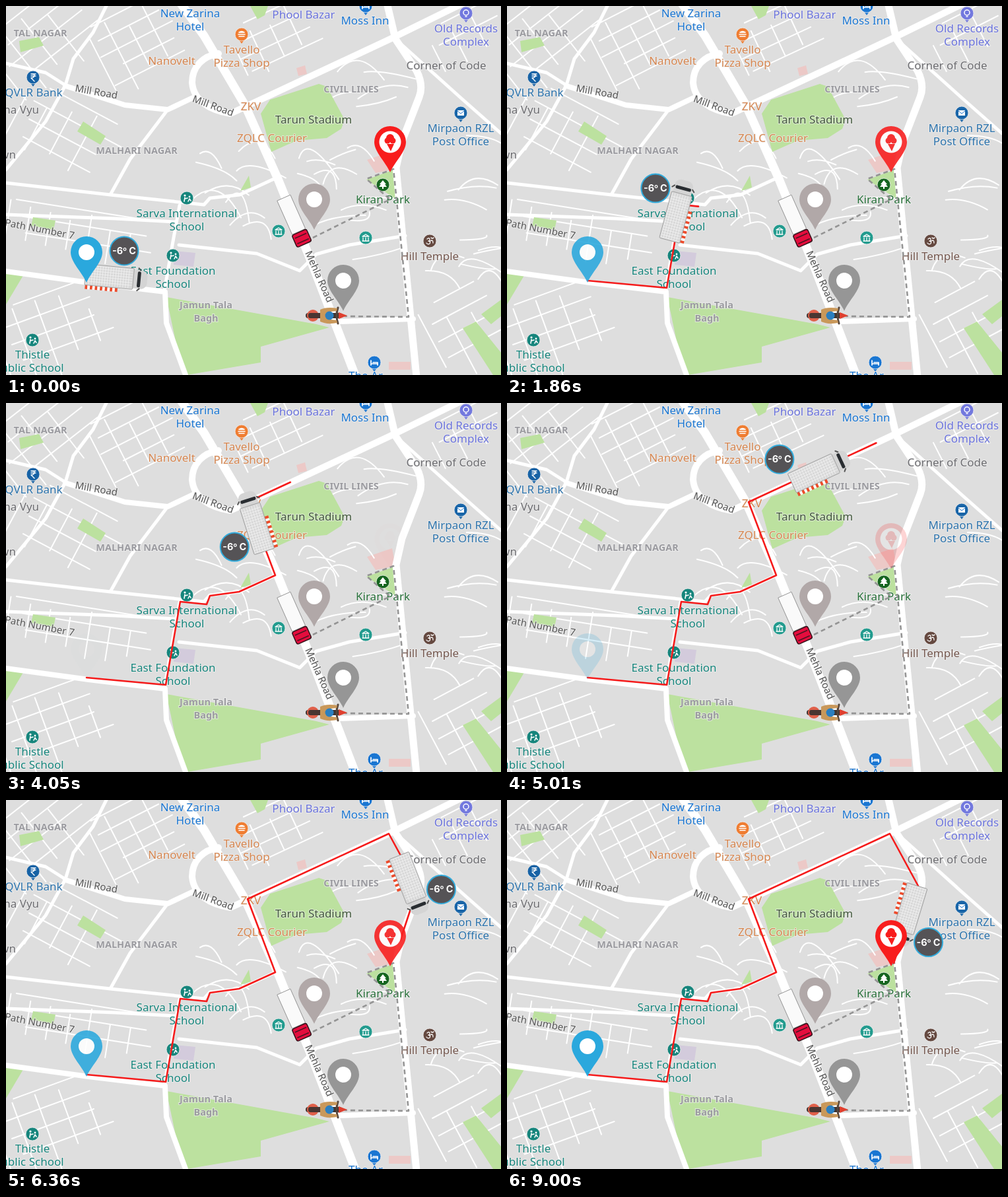
An HTML page for the animation above (9300 ms loop, 750 by 559 pixels).

```html
<!DOCTYPE html>
<html lang="en">
<head>
<meta charset="utf-8">
<title>Cold delivery route</title>
<style>
html, body { margin: 0; width: 100%; height: 100%; overflow: hidden; background: #dedede; }
svg { display: block; width: 750px; height: 559px; }
text { font: 500 17px "Noto Sans", "Open Sans", sans-serif; text-anchor: middle; paint-order: stroke; stroke: #f0f0f0aa; stroke-width: 2px; }
.area { font-weight: 700; font-size: 14.5px; }
.road { font-size: 15px; }
.badge { font: 700 14.5px Inter, sans-serif; fill: #fff; stroke: none; }
.line { fill: none; stroke-linejoin: round; stroke-linecap: round; }
</style>
</head>
<body>
<svg id="stage" viewBox="0 0 750 559"></svg>
<script>
const END = 9000, LOOP = 9300, PULSE = 900, ROUTE_SPEED = 0.1475;

const group = (x, y, body, angle = 0) => `<g transform="translate(${x} ${y}) rotate(${angle})">${body}</g>`;
const line = (d, w, color = "#fff", extra = "") =>
  `<path class="line" d="${d}" stroke="${color}" stroke-width="${w}" ${extra}/>`;
const shape = (d, fill) => `<path d="${d}" fill="${fill}"/>`;
const rect = (x, y, w, h, fill, extra = "") =>
  `<rect x="${x}" y="${y}" width="${w}" height="${h}" fill="${fill}" ${extra}/>`;
const disc = (x, y, r, fill, extra = "") => `<circle cx="${x}" cy="${y}" r="${r}" fill="${fill}" ${extra}/>`;
const repeat = (n, f) => Array.from({ length: n }, (_, i) => f(i)).join("");

let seed = 7;
const random = () => (seed = seed * 16807 % 2147483647) / 2147483647;
const between = (a, b) => a + (b - a) * random();

// crossing streets of uneven length, turned as one
function district(x, y, w, h, angle, step) {
  const rows = repeat(Math.floor(h / step), i =>
    `M${-w / 2 * between(.5, 1)} ${i * step - h / 2}H${w / 2 * between(.5, 1)}`);
  const columns = repeat(Math.floor(w / step / 1.3), i =>
    `M${i * step * 1.3 - w / 2} ${-h / 2 * between(.3, 1)}V${h / 2 * between(.3, 1)}`);
  return group(x, y, line(rows + columns, 2), angle);
}
const lanes = (n, x, y, w, h) => line(repeat(n, () =>
  `M${between(x, x + w)} ${between(y, y + h)}q${between(10, 45)} ${between(-40, 10)} ${between(30, 80)} ${between(-20, 35)}`), 2);

const streets =
  district(70, 55, 170, 130, -38, 27) + district(205, 60, 130, 120, -27, 24) +
  district(415, 55, 130, 100, -25, 24) + district(90, 205, 170, 120, 28, 28) +
  district(120, 350, 240, 80, 9, 24) + district(85, 495, 190, 130, -20, 28) +
  district(710, 490, 130, 130, -28, 28) + district(700, 45, 110, 70, -27, 28) +
  lanes(9, 270, 190, 90, 150) + lanes(12, 435, 210, 110, 190) + lanes(12, 610, 170, 110, 250) + lanes(5, 490, 90, 70, 80);

const parks = shape(
  "M386 163L400 142L474 118L486 122L513 172L508 186L486 200L440 204L402 221Z" +
  "M243 441L470 482L490 487L386 516V540L268 560Z M0 403L28 405L0 452Z" +
  "M20 53L50 47L57 60L22 70Z M117 175L151 197L143 210L108 190Z M41 320L75 325L72 339L38 333Z" +
  "M368 257L371 275L355 280Z M546 263L588 248L590 292Z M370 0H397L392 14L381 20Z" +
  "M720 467L750 445V470L735 482Z M692 488L712 478L750 525V559H738Z", "#bce19f");
const blocks =
  shape("M547 233L585 220L590 247L560 253Z M580 539H613V551H580Z M440 94L453 90L456 103L443 106Z", "#ecc9c7") +
  shape("M255 371L287 374L284 395L254 392Z", "#d3cbdc");

const roads =
  line("M0 87L60 101L90 120L102 80L132 40L152 0M90 120L60 175L0 248M245 157L188 232L158 286" +
    "M0 268L158 286L300 301L309 291L354 286L408 261M0 316L165 322L258 327" +
    "M262 362L380 375L445 401L470 376L520 362L605 348M240 432L252 362L263 302M590 50L690 140L750 193", 5) +
  line("M0 402L125 419L241 433L243 480L272 559M90 121L180 150L245 157L285 138M505 478L617 474", 8) +
  line("M322 72C298 76 282 92 282 116C284 144 310 158 340 163L364 152L580 51L692 -4", 10) +
  line("M577 -5L590 50L622 98Q633 120 626 138L600 205L591 245L601 350L622 562", 11) +
  line("M264 -5L300 45L362 150L412 262L466 396L530 562", 13);

const blue = "#1a76d2", navy = "#2c73ac", teal = "#16857c", orange = "#d68650", violet = "#6a72dc",
  gray = "#6c6c70", pale = "#9b9ba0", dark = "#555";
const label = (x, y, color, words, kind = "", angle = 0) => words.split("|").map((s, i) =>
  group(x, y + i * 20, `<text class="${kind}" fill="${color}">${s}</text>`, angle)).join("");
const labels =
  label(279, 17, blue, "New Zarina|Hotel") + label(544, 28, blue, "Moss Inn") + label(545, 566, blue, "The Ar") +
  label(451, 19, violet, "Phool Bazar") + label(697, 40, violet, "Old Records|Complex") +
  label(357, 72, orange, "Tavello|Pizza Shop") + label(251, 89, orange, "Nanovelt") +
  label(371, 158, orange, "ZKV") + label(403, 206, orange, "ZQLC Courier") +
  label(42, 137, navy, "QVLR Bank") + label(689, 191, navy, "Mirpaon RZL|Post Office") +
  label(667, 96, gray, "Corner of Code") + label(18, 163, gray, "ona Vyu") + label(3, 231, gray, "wn") +
  label(274, 320, teal, "Sarva International|School") + label(253, 407, teal, "East Foundation|School") +
  label(40, 534, teal, "Thistle|ublic School") + label(466, 178, "#40563a", "Tarun Stadium") +
  label(571, 299, "#28713a", "Kiran Park") + label(642, 385, "#74574e", "Hill Temple") +
  label(52, 46, pale, "TAL NAGAR", "area") + label(198, 224, pale, "MALHARI NAGAR", "area") +
  label(523, 131, pale, "CIVIL LINES", "area") + label(303, 458, pale, "Jamun Tala|Bagh", "area") +
  label(136, 135, dark, "Mill Road", "road", 10) + label(312, 156, dark, "Mill Road", "road", 20) +
  label(50, 343, dark, "Path Number 7", "road", 11) + label(470, 412, dark, "Mehla Road", "road", 66);

const glyphs = {
  school: disc(-3, -4, 1.6, "#fff") + disc(4, -2, 1.4, "#fff") + line("M-3 -1L-4 5M-3 1L1 0M4 1L2 5M4 1L6 4", 1.6),
  museum: line("M-5 -2L0 -5L5 -2ZM-4 0V4M0 0V4M4 0V4M-5 5H5", 1.3),
  bed: line("M-5 -3V4M-5 2H5V4M-2 0H5V2", 1.7),
  food: line("M-4 -3Q0 -6 4 -3ZM-5 0H5M-4 3H4", 1.6),
  mail: rect(-5, -4, 10, 8, "#fff") + line("M-5 -3L0 1L5 -3", 1, blue),
  rupee: line("M-3 -5H4M-3 -2H4M-3 -5Q3 -5 2 -2Q1 1 -3 1L2 6", 1.4),
  tree: shape("M0 -7L5 -1H3L6 3H1V6H-1V3H-6L-3 -1H-5Z", "#fff"),
  bulb: disc(0, -1, 4, "none", 'stroke="#fff" stroke-width="1.5"') + line("M-1 5H1", 1.5),
  temple: line("M-4 -3Q0 -6 0 -2Q0 0 -2 0Q2 1 0 4Q-3 6 -5 3M1 0Q5 -3 5 3M2 -5Q4 -3 6 -5", 1.3)
};
const spot = (x, y, color, kind) =>
  group(x, y, disc(0, 0, 10, color, 'stroke="#eee" stroke-width=".8"') + glyphs[kind]);
const marker = (x, y, color, kind) => group(x, y, shape("M-5 7L0 14L5 7Z", color)) + spot(x, y, color, kind);
const pois =
  spot(274, 291, teal, "school") + spot(253, 378, teal, "school") + spot(40, 506, teal, "school") +
  spot(413, 341, "#229b8e", "museum") + spot(545, 351, "#229b8e", "museum") +
  spot(571, 271, "#15651f", "tree") + spot(642, 356, "#654940", "temple") +
  marker(357, 43, "#ef7d32", "food") + marker(41, 108, "#1762a5", "rupee") + marker(545, 0, blue, "bed") +
  marker(558, 540, blue, "bed") + marker(689, 162, "#1965a8", "mail") + marker(697, 11, "#7278de", "bulb");

const pin = (x, y, color, inner, id) => `<g id="${id}">` + group(x, y,
  shape("M0 46C-7 30 -24 15 -24 0A24 24 0 0 1 24 0C24 15 7 30 0 46Z", color) + inner) + "</g>";
const hole = disc(0, 0, 12, "#fff");
const cone = disc(0, 0, 16.5, "#fff") + disc(0, -6, 6, "#f81d1d") + disc(-4, -2, 4.5, "#f81d1d") +
  disc(4, -2, 4.5, "#f81d1d") + shape("M-5 3H6L1 14Z", "#f81d1d");

const mesh = (x, y, w, h) => line(
  repeat(w / 4, i => `M${x + 4 * i} ${y}v${h}`) + repeat(h / 4, i => `M${x} ${y + 4 * i}h${w}`), .7, "#f4f4f4");
const parked = group(433, 318,
  rect(-30, -11, 56, 22, "#fafafa", 'stroke="#888" stroke-width=".8"') +
  rect(27, -12, 20, 24, "#e40d3d", 'rx="3" stroke="#331018" stroke-width="1.5"') +
  line("M33 -9V9M42 -9V9", 1.5, "#4b1522"), 66);
const scooter = group(484, 469,
  rect(-30, -4, 55, 8, "#3f3532", 'rx="4"') + disc(-19, 0, 9, "#e0604a") + rect(-26, -4, 18, 8, "#4a3632", 'rx="3"') +
  line("M19 -12Q15 0 19 12", 3, "#57463c") + shape("M-8 -9Q2 -14 18 -11L17 -7L8 -6V6L17 7L18 11Q2 14 -8 9Z", "#c9985a") +
  disc(6, 0, 6.5, "#2b7fc0") + shape("M20 -5L33 0L20 5Z", "#e0402f"));

const truckArt =
  repeat(13, i => rect(-46 + i * 3.8, 14, 3.8, 8, i % 2 ? "#fff" : "#ee4b2b")) +
  shape("M24 -14H40Q46 -12 47 -6V6Q46 12 40 14H24Z", "#d4d4d4") +
  rect(-47, -16, 73, 32, "#d8d8d8", 'rx="1.5" stroke="#999" stroke-width=".8"') + mesh(-45, -14, 69, 28) +
  rect(32, -12, 5, 24, "#292d31", 'rx="2"') + line("M36 -14L33 -17M36 14L33 17", 2, "#555");
const badgeArt = disc(0, 0, 21.5, "#555356", 'stroke="#31abdc" stroke-width="2"') +
  '<text class="badge" y="5">-6<tspan font-size="9" dy="-5">o</tspan><tspan dy="5"> C</tspan></text>';

const routePath = "M122 416L242 427L264 301L304 305L309 292L353 286L408 261L366 150L580 51L624 132L586 247";
const truckPath = "M167 411L240 418L260 300L285 303L400 252L368 151L583 52L618 142L608 175";
const byId = id => document.getElementById(id);
byId("stage").innerHTML =
  rect(0, 0, 750, 559, "#dedede") + blocks + streets + parks + roads + pois + labels +
  line("M465 351L582 293L546 262L587 247L610 471L513 470", 2.6, "#949494", 'stroke-dasharray="7 5" style="stroke-linecap:butt"') +
  pin(467, 293, "#b1a8a8", hole, "store") + parked + pin(511, 416, "#969696", hole, "depot") + scooter +
  line(routePath, 2.6, "#f51b1b", 'id="route"') + line(truckPath, 0, "none", 'id="guide"') +
  `<g id="truck">${truckArt}</g>` + pin(122, 373, "#2aa8dd", hole, "start") +
  pin(582, 206, "#f81d1d", cone, "goal") + `<g id="badge">${badgeArt}</g>`;

const guide = byId("guide"), guideLength = guide.getTotalLength();
// time, distance driven, badge shift along the truck
const stops = [[0, 0, 8], [1860, 183, 24], [3030, 262, -3], [5010, 567, -49], [6360, 768, 24], [7100, guideLength, 30]];
function driveAt(t) {
  const i = stops.findIndex(k => k[0] > t);
  if (i < 0) return stops.at(-1);
  const a = stops[i - 1], b = stops[i], p = (t - a[0]) / (b[0] - a[0]);
  return a.map((v, j) => v + (b[j] - v) * p);
}

function draw() {
  const t = Math.min(performance.now() % LOOP, END);
  const [, driven, shift] = driveAt(t);
  const { x, y } = guide.getPointAtLength(driven);
  const back = guide.getPointAtLength(Math.max(driven - 12, 0));
  const front = guide.getPointAtLength(Math.min(driven + 12, guideLength));
  const turn = Math.atan2(front.y - back.y, front.x - back.x), c = Math.cos(turn), s = Math.sin(turn);
  byId("truck").setAttribute("transform", `translate(${x} ${y}) rotate(${turn * 180 / Math.PI})`);
  byId("badge").setAttribute("transform", `translate(${x + shift * c + 41 * s} ${y + shift * s - 41 * c})`);
  byId("route").setAttribute("stroke-dasharray", `${t * ROUTE_SPEED} 2000`);
  const glow = Math.abs(2 * (t % PULSE) / PULSE - 1) ** 0.85;
  for (const id of ["start", "goal"]) byId(id).setAttribute("opacity", glow);
  requestAnimationFrame(draw);
}
draw();
</script>
</body>
</html>
```
